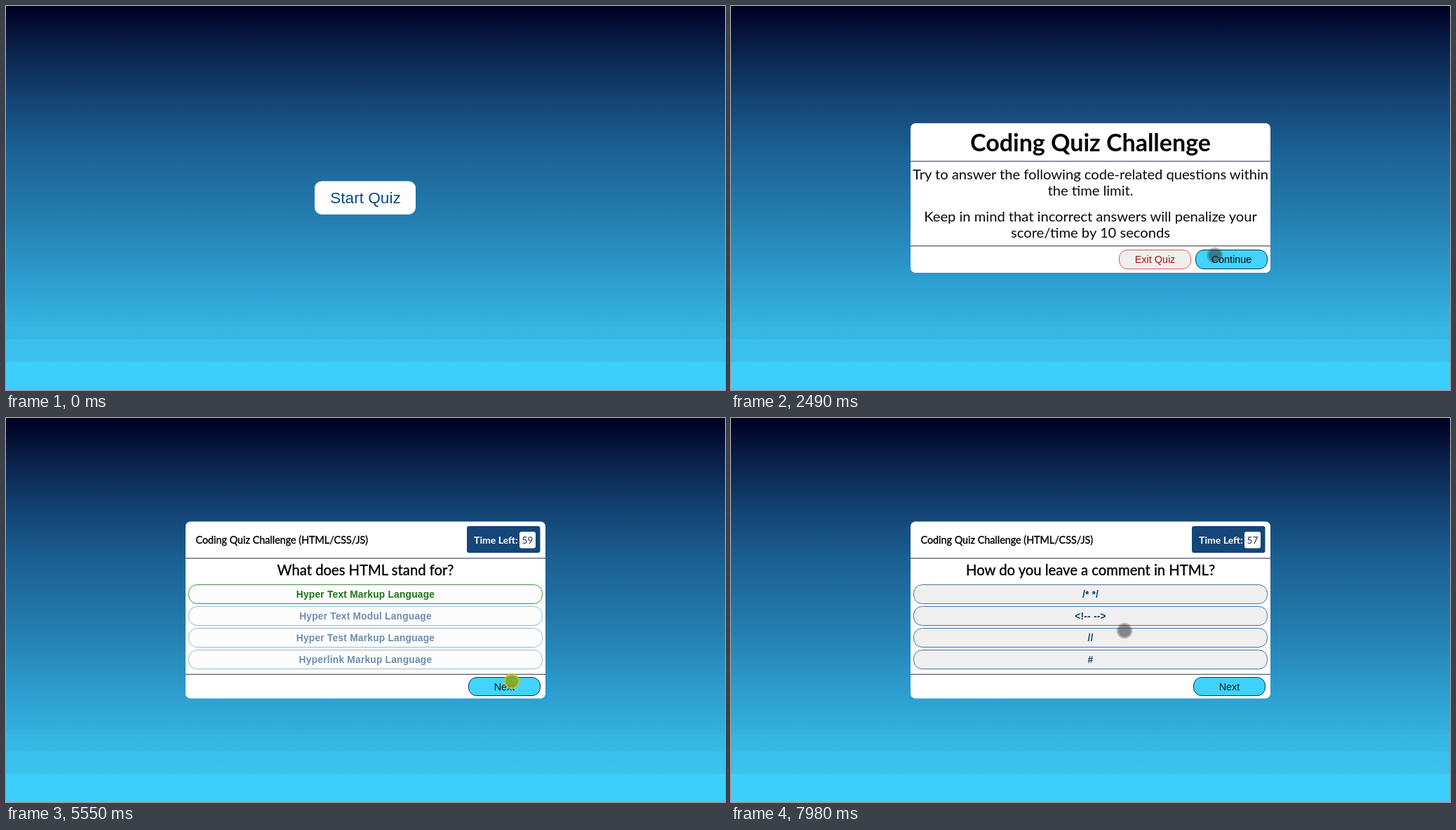
An HTML page that plays this animation: 1025 px wide and 547 px high, repeating every 8 s.

```html
<!DOCTYPE html>
<html lang="en">
<head>
<meta charset="utf-8">
<title>Coding Quiz Challenge</title>
<style>
  html, body { margin: 0; width: 100%; height: 100%; overflow: hidden; }
  body {
    background: linear-gradient(#000022 0, #0b2650 70px, #134272 130px, #1b5f92 200px,
      #247daf 300px, #2ea0d2 400px, #31abdb 432px, #32addb 432px, #33b0de 450px,
      #35b5e2 450px, #36b8e5 475px, #3abfec 475px, #3bc2ee 507px, #3dcffc 507px);
  }
  svg { display: block; width: 1025px; height: 547px; }
  text { font-family: Lato, "Open Sans", sans-serif; }
  .ui { font-family: "Liberation Sans", Arial, sans-serif; }
  .mid { text-anchor: middle; }
  .medium { stroke: currentColor; stroke-width: .35px; }
  .option { font-weight: 700; font-size: 13.8px; letter-spacing: .2px; }
  .copy { font-size: 20.15px; }
</style>
</head>
<body>
<svg viewBox="0 0 1025 547">
  <g id="scene"></g>
  <rect id="tap" fill="#33b5e5" rx="2"/>
  <g id="cursor">
    <circle id="halo" r="11.3"/>
    <circle id="core" r="9"/>
  </g>
</svg>
<script>
const LOOP = 8000;
const $ = id => document.getElementById(id);

const questions = [
  { title: 'What does HTML stand for?', answer: 0, options: [
    'Hyper Text Markup Language', 'Hyper Text Modul Language',
    'Hyper Test Markup Language', 'Hyperlink Markup Language'] },
  { title: 'What does CSS stand for?', answer: 2, options: [
    'Customized Style Sheets', 'Creative Styled Sheets',
    'Cascading Style Sheets', 'Cascading Sheet Styles'] },
  { title: 'How do you leave a comment in HTML?', answer: 1, options: [
    '/* */', '<!-- -->', '//', '#'] }
];

// from, view, question, answered
const views = [
  [0, 'start'], [1490, 'intro'],
  [3040, 'quiz', 0, false], [4440, 'quiz', 0, true],
  [5610, 'quiz', 1, false], [6410, 'quiz', 1, true],
  [7440, 'quiz', 2, false]
];
const ticks = [[0, 60], [5030, 59], [6030, 58], [7030, 57]];

// from, to, steps, x, y at the end
const moves = [
  [630, 740, 3, 536, 430], [790, 1340, 10, 498.5, 287],
  [1900, 2550, 14, 701, 359], [3550, 4340, 16, 528, 254.5],
  [4740, 5250, 10, 721, 375], [5710, 6320, 12, 564, 317],
  [6620, 7080, 9, 716, 382], [7180, 7180, 1, 716.5, 382.5],
  [7540, 7980, 9, 561, 303]
];
const presses = [[1440, 1490], [2990, 3040], [4390, 4440], [5550, 5610], [6360, 6410], [7390, 7440]];

const optionY = i => 237 + i * 31;
const nextBox = [659, 369, 103, 27];
const taps = [
  [4440, 260, optionY(0), 505, 28], [5610, ...nextBox],
  [6410, 260, optionY(2), 505, 28], [7440, ...nextBox]
];

const escape = s => s.replace(/&/g, '&amp;').replace(/</g, '&lt;').replace(/>/g, '&gt;');
const label = (s, x, y, size, fill, cls = '', extra = '') =>
  `<text x="${x}" y="${y}" ${size ? `font-size="${size}"` : ''} fill="${fill}" color="${fill}" class="${cls}" ${extra}>${escape(s)}</text>`;
const box = (x, y, w, h, r, fill) =>
  `<rect x="${x}" y="${y}" width="${w}" height="${h}" rx="${r}" fill="${fill}"/>`;
const outlined = (x, y, w, h, r, fill, stroke) =>
  `<rect x="${x + .5}" y="${y + .5}" width="${w - 1}" height="${h - 1}" rx="${r}" fill="${fill}" stroke="${stroke}"/>`;
const rule = y => box(256, y, 513, 1.5, 0, '#6b7285');
const button = (s, x, y, w, h, fill, stroke, ink) =>
  outlined(x, y, w, h, 11.5, fill, stroke) + label(s, x + w / 2, y + h / 2 + 5, 14.4, ink, 'ui mid');

function startView() {
  return box(440, 249.5, 144, 47.5, 10, '#fdfdfd') +
    label('Start Quiz', 512.5, 281, 22.6, '#0c4a82', 'ui mid');
}

function introView() {
  const copy = [
    ['Try to answer the following code-related questions within', 247],
    ['the time limit.', 270],
    ['Keep in mind that incorrect answers will penalize your', 307],
    ['score/time by 10 seconds', 330]
  ];
  return box(256, 167, 513, 213, 7, '#fff') + rule(220.5) + rule(341) +
    label('Coding Quiz Challenge', 512.5, 207, 34, '#000', 'mid', 'font-weight="700"') +
    copy.map(([s, y]) => label(s, 512.5, y, 0, '#0a0a0a', 'copy mid')).join('') +
    button('Exit Quiz', 553, 347, 103, 28, '#efefef', '#e2584a', '#a8120c') +
    button('Continue', 662, 347, 103, 28, '#40d4ff', '#0c3050', '#000');
}

function optionView(s, i, state) {
  const [fill, stroke, ink] = {
    open: ['#efefef', '#44729f', '#143f72'],
    closed: ['#fcfcfc', '#9ab6cd', '#6b8fb2'],
    right: ['#fcfcfc', '#3a9433', '#1f7414']
  }[state];
  const y = optionY(i);
  return outlined(260, y, 505, 28, 12, fill, stroke) +
    label(s, 512.5, y + 18.5, 0, ink, 'ui option mid');
}

function quizView(index, answered, seconds) {
  const q = questions[index];
  const state = i => !answered ? 'open' : i === q.answer ? 'right' : 'closed';
  return box(256, 147.5, 513, 252, 7, '#fff') + rule(199) + rule(364.5) +
    label('Coding Quiz Challenge (HTML/CSS/JS)', 270.5, 178.5, 14.35, '#000', 'medium') +
    box(657, 154, 104.5, 38, 3, '#15467a') +
    label('Time Left:', 667, 178.5, 14.1, '#fff', '', 'font-weight="700"') +
    box(732, 162, 23, 23.5, 3, '#fff') +
    label(String(seconds), 743.5, 178.5, 13.8, '#24344c', 'mid') +
    label(q.title, 512.5, 224, 20.25, '#000', 'medium mid') +
    q.options.map((s, i) => optionView(s, i, state(i))).join('') +
    button('Next', ...nextBox, '#40d4ff', '#0c3050', '#041428');
}

const latest = (rows, t) => rows.filter(r => r[0] <= t).pop();
const smooth = u => u * u * (3 - 2 * u);

function cursorAt(t) {
  let x = 484, y = 546;
  for (const [from, to, steps, endX, endY] of moves) {
    if (t < from) break;
    const k = t >= to ? steps : Math.floor((t - from) / (to - from) * (steps - 1)) + 1;
    const u = from === 630 ? k / steps : smooth(k / steps);
    x += (endX - x) * u;
    y += (endY - y) * u;
  }
  return [x, y];
}

let shown = '';
function drawScene(t) {
  const [, view, index, answered] = latest(views, t);
  const seconds = latest(ticks, t)[1];
  const key = [view, index, answered, view === 'quiz' && seconds].join();
  if (key === shown) return;
  shown = key;
  $('scene').innerHTML = view === 'start' ? startView()
    : view === 'intro' ? introView() : quizView(index, answered, seconds);
}

function drawTap(t) {
  const tap = latest(taps, t);
  const age = tap ? t - tap[0] : LOOP;
  const fade = Math.min(1, Math.max(0, 1 - (age - 120) / 480));
  $('tap').setAttribute('opacity', .4 * fade);
  if (tap) ['x', 'y', 'width', 'height'].forEach((name, i) => $('tap').setAttribute(name, tap[i + 1]));
}

function drawCursor(t) {
  const [x, y] = cursorAt(t);
  const pressed = presses.some(([a, b]) => t >= a && t < b);
  $('cursor').setAttribute('transform', `translate(${x} ${y})`);
  $('cursor').setAttribute('visibility', t < 630 ? 'hidden' : 'visible');
  $('halo').setAttribute('fill', pressed ? 'rgba(200,196,20,.8)' : 'rgba(50,50,50,.3)');
  $('core').setAttribute('fill', pressed ? 'rgba(90,140,40,.5)' : 'rgba(50,50,50,.36)');
}

const begin = performance.now();
function frame() {
  const t = (performance.now() - begin) % LOOP;
  drawScene(t);
  drawTap(t);
  drawCursor(t);
  requestAnimationFrame(frame);
}
frame();
</script>
</body>
</html>
```
